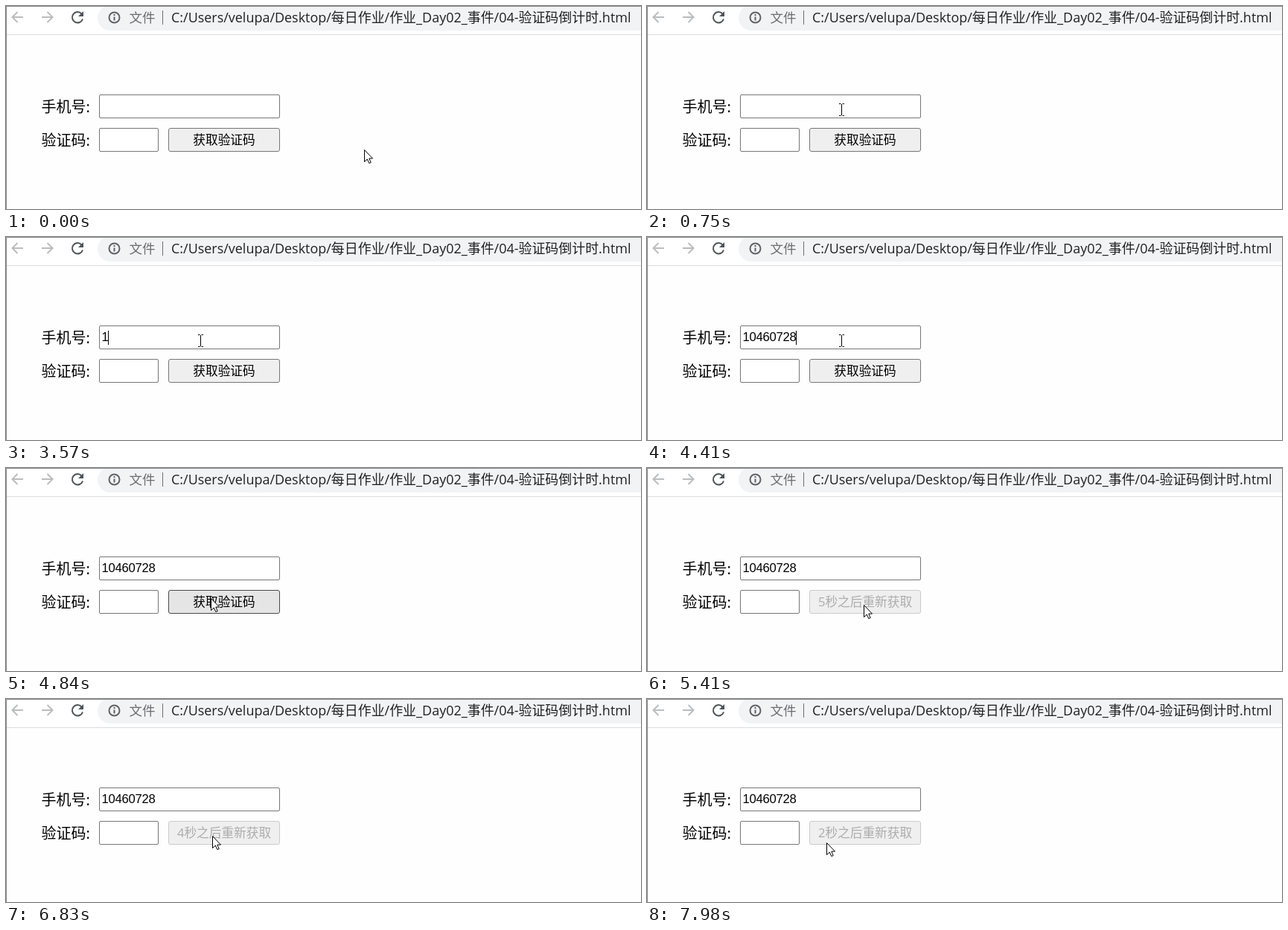
An HTML page for the animation above (8000 ms loop, 853 px wide and 273 px high).

```html
<!DOCTYPE html>
<html lang="zh">
<head>
<meta charset="utf-8">
<style>
  html, body { margin: 0; width: 100%; height: 100%; overflow: hidden; background: #fefefe; }
  svg { display: block; width: 853px; height: 273px; }
  text { font-family: "Open Sans", "Noto Sans CJK SC", "Noto Sans CJK", sans-serif; white-space: pre; }
  .url { font-size: 17.95px; fill: #202124; }
  .scheme { font-size: 17.5px; fill: #6a6d71; }
  .label { font-size: 20px; }
  #caption { font-size: 16.67px; text-anchor: middle; }
  #phone { font: 16.67px "Liberation Sans", Arial, sans-serif; letter-spacing: -.27px; }
  .icon { fill: none; stroke-width: 2; }
  .field { fill: #fff; stroke: #767676; }
</style>
</head>
<body>
<svg viewBox="0 0 853 273">
  <rect width="853" height="38" fill="#fff"/>
  <rect y="38" width="853" height="1" fill="#dadce0"/>
  <rect x="123" y="-1" width="800" height="34" rx="17" fill="#f1f3f4"/>
  <path d="M853 .5H.5V273" fill="none" stroke="#858585"/>

  <g class="icon" stroke="#babcbe">
    <path d="M23 15H9M15.500 8l-7 7 7 7"/>
    <path d="M48 15h14M55.500 8l7 7-7 7"/>
  </g>
  <path class="icon" stroke="#505357" d="M101.500 10.500a7.200 7.200 0 1 0 1.500 7"/>
  <path fill="#505357" d="M104 7v7h-7z"/>
  <circle class="icon" cx="145.500" cy="15.500" r="7" stroke="#5f6368"/>
  <path fill="#5f6368" d="M144.500 14.500h2v5h-2zM144.500 11h2v2h-2z"/>
  <text class="scheme" x="165.500" y="22">文件</text>
  <rect x="210" y="6" width="1" height="19" fill="#6a6d71"/>
  <text class="url" x="222" y="22">C:/Users/velupa/Desktop/每日作业/作业_Day02_事件/04-验证码倒计时.html</text>

  <text class="label" x="47.500" y="143">手机号:</text>
  <text class="label" x="47.500" y="188">验证码:</text>
  <rect id="input" class="field" x="125.500" y="119.500" width="242" height="31" rx="1.500"/>
  <rect class="field" x="125.500" y="164.500" width="79" height="31" rx="1.500"/>
  <rect id="button" x="218.500" y="164.500" width="149" height="31" rx="2.500"/>
  <text id="phone" x="128.500" y="140"></text>
  <rect id="caret" y="126" width="1" height="19"/>
  <text id="caption" x="293" y="186.300"></text>

  <path id="arrow" fill="#fff" stroke="#000" d="M.5.5V16.500L4.300 13 6.800 18.500 9.200 17.500 6.800 12H11.500z"/>
  <path id="beam" fill="none" stroke="#000" d="M-3-7.500H-.5M1.500-7.500H4M.5-7V8M-3 8.500H-.5M1.500 8.500H4"/>
</svg>
<script>
const LOOP = 8000;
const STEP = 150; // the pointer is redrawn this often while it moves
const PHONE = "10460728";
const FOCUS = 1930, TYPING = 3570, KEY_GAP = 105, BLUR = 4840, SENT = 4980;
const $ = id => document.getElementById(id);

const home = { x: 481, y: 193 };
const moves = [
  { from: 0, to: 750, x: 261, y: 139 },
  { from: 4410, to: 4840, x: 275, y: 175 },
  { from: 5260, to: 5710, x: 336, y: 208 },
  { from: 5710, to: 6080, x: 251, y: 163 },
  { from: 6080, to: 6830, x: 277, y: 184 },
  { from: 6830, to: 7410, x: 266, y: 198 },
  { from: 7530, to: 7980, x: 241, y: 193 }
];

const clamp = (v, min, max) => Math.min(max, Math.max(min, v));
const within = (t, from, to) => t >= from && t < to;
const smooth = p => p * p * (3 - 2 * p);
const set = (id, attrs) => {
  for (const name in attrs) $(id).setAttribute(name, attrs[name]);
};
const show = (id, visible) => set(id, { visibility: visible ? "visible" : "hidden" });

function pointerAt(t) {
  let { x, y } = home;
  for (const move of moves) {
    if (t < move.from) break;
    const elapsed = Math.floor((t - move.from) / STEP) * STEP;
    const p = t >= move.to ? 1 : smooth(elapsed / (move.to - move.from));
    x += (move.x - x) * p;
    y += (move.y - y) * p;
  }
  return [Math.round(x), Math.round(y)];
}

function render(t) {
  const [x, y] = pointerAt(t);
  const overInput = within(x, 125, 368) && within(y, 119, 151);
  const overButton = within(x, 218, 368) && within(y, 164, 196);
  for (const id of ["arrow", "beam"]) set(id, { transform: `translate(${x} ${y})` });
  show("arrow", !overInput);
  show("beam", overInput);

  const pressed = within(t, FOCUS, FOCUS + STEP);
  set("input", { stroke: pressed ? "#8d8d8d" : overInput ? "#4a4a4a" : "#767676" });
  const count = clamp(1 + Math.floor((t - TYPING) / KEY_GAP), 0, PHONE.length);
  $("phone").textContent = PHONE.slice(0, count);
  set("caret", { x: 128 + count * 9 });
  show("caret", within(t, FOCUS, BLUR) && !within(t, 2490, 2950));

  const sent = t >= SENT;
  const left = 5 - Math.floor((t - SENT) / 1000);
  $("caption").textContent = sent ? left + "秒之后重新获取" : "获取验证码";
  set("caption", { fill: sent ? "#acacac" : "#000" });
  set("button", {
    fill: overButton && !sent ? "#e5e5e5" : "#efefef",
    stroke: sent ? "#cbcbcb" : overButton ? "#4a4a4a" : "#767676"
  });
}

function tick() {
  render(performance.now() % LOOP);
  requestAnimationFrame(tick);
}
tick();
</script>
</body>
</html>
```
